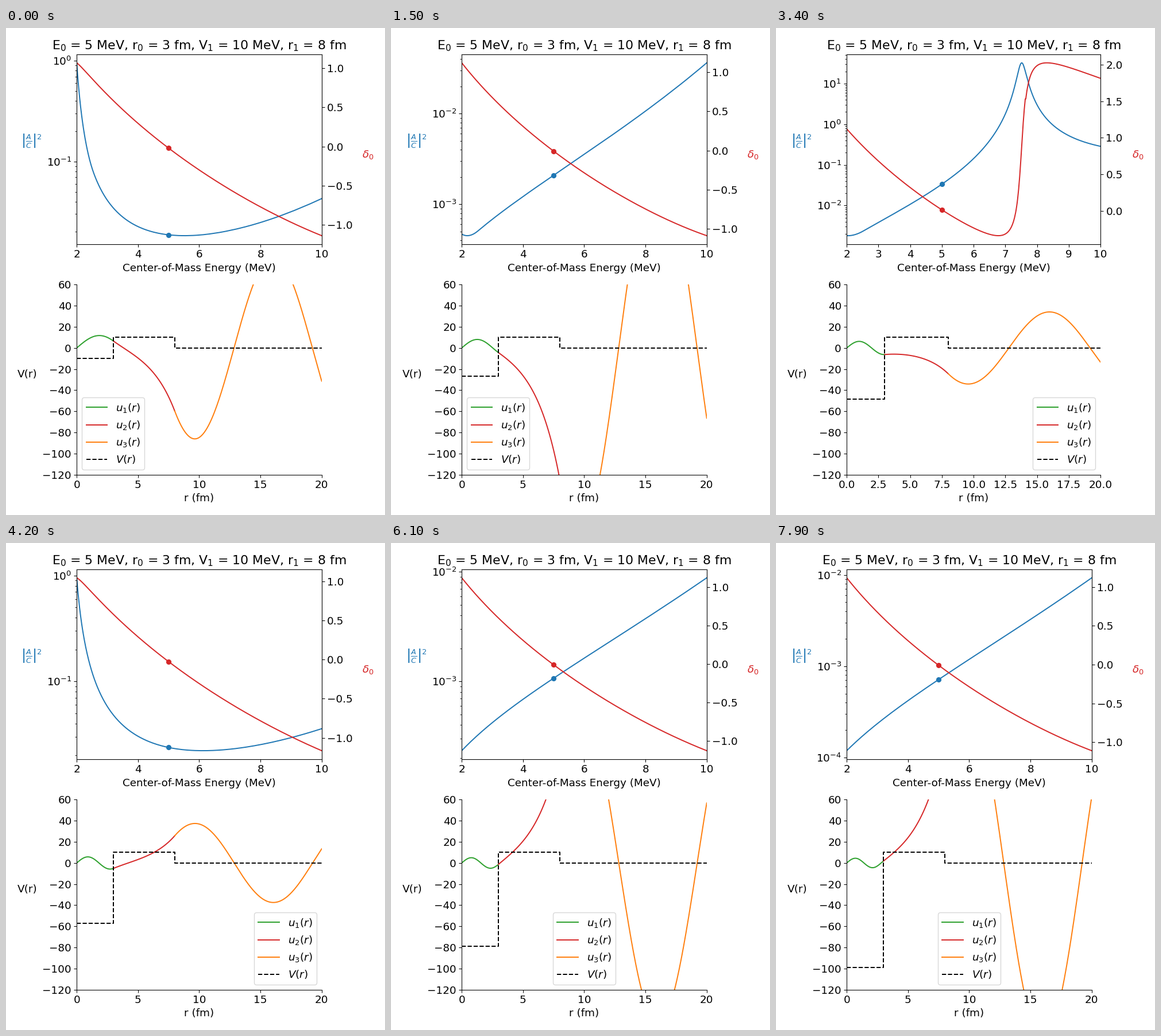
A matplotlib script for the animation above (8000 ms loop, 660 px wide and 849 px high).

```python
import numpy as np
import matplotlib.pyplot as plt
from matplotlib.animation import FuncAnimation

FRAMES, INTERVAL = 80, 100
DPI = 94.3
C = 2 * 938.272 / 197.327**2    # 2m / hbar^2 in 1 / (MeV fm^2)
E0, R0, V1, R1, R_MAX = 5, 3, 10, 8, 20
HALF_STEP = 0.005               # a potential sampled every 0.01 fm steps late
WELL_END, BARRIER_END = R0 + HALF_STEP, R1 + HALF_STEP
SLOPE = 10                      # u'(0)

plt.rcParams["font.size"] = 14

energy = np.linspace(2, 10 - 1e-6, 500)
r_in = np.linspace(0, R0, 100)
r_mid = np.linspace(R0, R1, 100)
r_out = np.linspace(R1, R_MAX, 200)


def solve(e, depth):
    """Radial wave in the well, the barrier and outside, plus phase shift."""
    K, q, k = np.sqrt(C * (e + depth)), np.sqrt(C * (V1 - e)), np.sqrt(C * e)
    u0, d0 = SLOPE * np.sin(K * WELL_END) / K, SLOPE * np.cos(K * WELL_END)
    width = q * (BARRIER_END - WELL_END)
    u1 = u0 * np.cosh(width) + d0 * np.sinh(width) / q
    d1 = u0 * q * np.sinh(width) + d0 * np.cosh(width)

    def well(r):
        return SLOPE * np.sin(K * r) / K

    def barrier(r):
        x = q * (r - WELL_END)
        return u0 * np.cosh(x) + d0 * np.sinh(x) / q

    def outside(r):
        x = k * (r - BARRIER_END)
        return u1 * np.cos(x) + d1 * np.sin(x) / k

    phase = np.arctan2(k * u1, d1) - k * BARRIER_END
    phase = (phase + np.pi / 2) % np.pi - np.pi / 2
    return well, barrier, outside, SLOPE / K, phase


def join_branches(phase):
    steps = np.diff(phase)
    steps[np.abs(steps) > np.pi / 2] = 0
    return phase[0] + np.concatenate([[0], np.cumsum(steps)])


fig, (ax, ax_wave) = plt.subplots(
    2, 1, figsize=(660.001 / DPI, 849.001 / DPI), dpi=DPI)
ax_phase = ax.twinx()


def side_label(axes, text, color="black"):
    axes.set_ylabel(text, rotation=0, labelpad=20, color=color)


ax.set_title("E$_0$ = 5 MeV, r$_0$ = 3 fm, V$_1$ = 10 MeV, r$_1$ = 8 fm")
ax.set_xlabel("Center-of-Mass Energy (MeV)")
ax.set_xlim(2, 10)
ax.set_yscale("log")
side_label(ax, r"$\left|\frac{A}{C}\right|^2$", "tab:blue")
side_label(ax_phase, r"$\delta_0$", "tab:red")
ratio_line, = ax.plot([], [], color="tab:blue")
ratio_dot, = ax.plot([], [], "o", color="tab:blue")
phase_line, = ax_phase.plot([], [], color="tab:red")
phase_dot, = ax_phase.plot([], [], "o", color="tab:red")

ax_wave.set(xlim=(0, R_MAX), ylim=(-120, 60), xlabel="r (fm)")
side_label(ax_wave, "V(r)")
ax_wave.spines[["top", "right"]].set_visible(False)
well_line, = ax_wave.plot([], [], color="tab:green", label="$u_1(r)$")
barrier_line, = ax_wave.plot([], [], color="tab:red", label="$u_2(r)$")
outside_line, = ax_wave.plot([], [], color="tab:orange", label="$u_3(r)$")
potential_line, = ax_wave.plot([], [], "k--", label="$V(r)$")
legend = ax_wave.legend(loc="best")
legend.set_in_layout(False)


def set_tick_density(nbins):
    for axes in (ax_phase, ax_wave):
        axes.locator_params(axis="y", nbins=nbins)


def fit_layout():
    """Lay out from the default grid; the tick density grows afterwards."""
    fig.subplots_adjust(left=0.125, right=0.9, bottom=0.11, top=0.88,
                        wspace=0.2, hspace=0.2)
    set_tick_density(8)
    fig.tight_layout()
    set_tick_density(9)


def update(i):
    depth = 10 + 90 * i / FRAMES

    _, _, outside, amplitude, phase = solve(energy[:, None], depth)
    ratio = (amplitude[:, 0] / outside(r_out).max(axis=1)) ** 2
    phase = join_branches(phase[:, 0])
    ratio_line.set_data(energy, ratio)
    ratio_dot.set_data([E0], [np.interp(E0, energy, ratio)])
    phase_line.set_data(energy, phase)
    phase_dot.set_data([E0], [np.interp(E0, energy, phase)])
    for axes in (ax, ax_phase):
        axes.relim()
        axes.autoscale_view(scalex=False)

    well, barrier, outside, _, _ = solve(E0, depth)
    well_line.set_data(r_in, well(r_in))
    barrier_line.set_data(r_mid, barrier(r_mid))
    outside_line.set_data(r_out, outside(r_out))
    potential_line.set_data([0, R0, R0, R1, R1, R_MAX],
                            [-depth, -depth, V1, V1, 0, 0])
    fit_layout()


anim = FuncAnimation(fig, update, frames=FRAMES, interval=INTERVAL,
                     init_func=lambda: None, repeat=True, repeat_delay=0)
plt.show()
```
